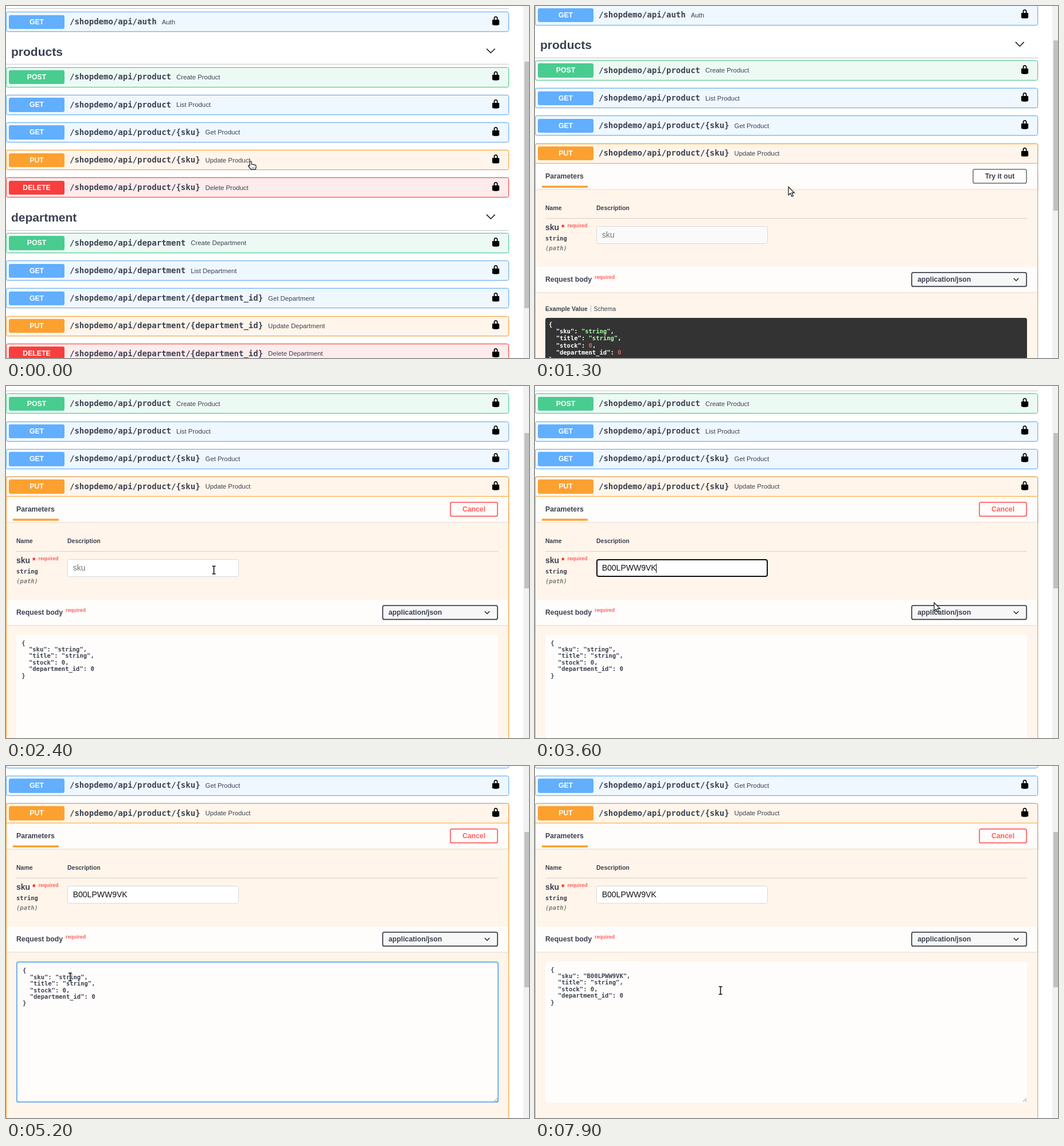
An HTML page for the animation above (8000 ms loop, 912 by 614 pixels).

```html
<!DOCTYPE html>
<html lang="en">
<head>
<meta charset="utf-8">
<title>API console</title>
<style>
  html, body { margin: 0; width: 100%; height: 100%; overflow: hidden; background: #fff; }
  svg { display: block; }
  text { font: 12.25px "Liberation Sans", Arial, sans-serif; fill: #3b4151; white-space: pre; }
  .b { font-weight: 700; }
  .m { font-family: "DejaVu Sans Mono", monospace; font-weight: 700; }
  .i { font-style: italic; }
  .mid { text-anchor: middle; }
  .row { filter: drop-shadow(0 0 1.3px rgba(0,0,0,.19)); }
  .band { filter: drop-shadow(0 1px 1px rgba(0,0,0,.1)); }
  .hover { filter: drop-shadow(0 0 2.5px rgba(0,0,0,.3)); }
</style>
</head>
<body>
<svg id="stage" width="912" height="614" viewBox="0 0 912 614"></svg>
<script>
const LOOP = 8000, STEP = 100;
const OPEN = 500, TRY = 2000, FOCUS_SKU = 3400, PASTE_SKU = 3500,
      FOCUS_BODY = 5200, SELECT = 5400, PASTE_BODY = 5600, CARET_OFF = 6400, BLUR = 7100;
const SKU = 'B00LPWW9VK', CODE_ADVANCE = 6.32, PATH_ADVANCE = 8.428;
const AUTH_Y = 10.1, PRODUCTS_LINE = 101.1, DEPARTMENT_LINE = 390.5;
const ROW_OFFSET = 5.5, ROW_PITCH = 48.2, PUT_Y = PRODUCTS_LINE + ROW_OFFSET + 3 * ROW_PITCH;
const INK = '#3b4151', ORANGE = '#fca130', RED = '#ff6060', PALE = '#fffdfb', RULE = '#c4c6ca';
const METHODS = {
  GET: ['#61affe', '#eff7ff'], POST: ['#49cc90', '#edfaf4'],
  PUT: [ORANGE, '#fff5ea'], DELETE: ['#f93e3e', '#feebeb']
};
const LOCK = 'M15.8 8H14V5.6C14 2.7 12.67 1 10 1S6 2.7 6 5.6V8H4c-.55 0-1 .65-1 1.2V17c0 .55.43 1.14.95 1.3l1.2.4c.52.16 1.4.3 1.95.3h5.8c.55 0 1.43-.14 1.95-.3l1.2-.4c.52-.16.95-.75.95-1.3V9.2C17 8.65 16.35 8 15.8 8zM12 8H8V5.2C8 3.75 8.8 3 10 3s2 .75 2 2.2z';

// Page heights are fractional; the browser snaps them to whole pixels after scrolling.
let scroll = 0;
const snap = y => Math.round(y - scroll);

const rect = (x, y, w, h, fill, extra = '') =>
  `<rect x="${x}" y="${y}" width="${w}" height="${h}" fill="${fill}" ${extra}/>`;
// Outer box with its border drawn inside the edge.
const box = (x, y, w, h, fill, stroke, line = 1, extra = '') =>
  rect(x + line / 2, y + line / 2, w - line, h - line, fill,
    `stroke="${stroke}" stroke-width="${line}" rx="3" ${extra}`);
const text = (x, y, str, size = 12.25, cls = 'b', fill = INK) =>
  `<text x="${x}" y="${y}" class="${cls}" style="font-size:${size}px;fill:${fill}">${str}</text>`;
const stroke = (d, color, width) =>
  `<path d="${d}" fill="none" stroke="${color}" stroke-width="${width}"/>`;
const span = (str, fill) => `<tspan style="fill:${fill}">${str}</tspan>`;

function summary(y, method, path, label) {
  const full = '/shopdemo/api/' + path;
  const top = snap(y + 5.4), bottom = snap(y + 29.8), baseline = snap(y + 21.4);
  return rect(5, top, 97, bottom - top, METHODS[method][0], 'rx="3"') +
    text(53.5, baseline, method, 12.25, 'b mid', '#fff') +
    text(111, snap(y + 21.7), full, 14, 'm') +
    text(111 + full.length * PATH_ADVANCE + 9, baseline, label, 11.375, '') +
    `<path d="${LOCK}" transform="translate(845.3 ${snap(y + 6.7)}) scale(.875)"/>`;
}

function row(y, method, path, label) {
  const [color, tint] = METHODS[method];
  return box(0, snap(y), 877, 35, tint, color, 1, 'class="row"') + summary(y, method, path, label);
}

function group(line, name, id) {
  const title = name[0].toUpperCase() + name.slice(1).replace(/s$/, '');
  const path = title.toLowerCase();
  const calls = [['POST', '', 'Create'], ['GET', '', 'List'], ['GET', id, 'Get'],
                 ['PUT', id, 'Update'], ['DELETE', id, 'Delete']];
  return text(9, snap(line - 14.1), name, 21) +
    stroke(`M838 ${line - 26.6 - scroll}l7.3 7.3 7.3-7.3`, '#111', 1.5) +
    rect(0, snap(line), 877, 1, RULE) +
    calls.map(([method, suffix, verb], i) =>
      row(line + ROW_OFFSET + i * ROW_PITCH, method, path + suffix, verb + ' ' + title)).join('');
}

const jsonLines = (sku, string = s => s, number = s => s) => [
  '{', `  "sku": ${sku},`, `  "title": ${string('"string"')},`,
  `  "stock": ${number('0')},`, `  "department_id": ${number('0')}`, '}'];
const code = (x, y, pitch, lines, fill) =>
  lines.map((line, i) => text(x, y + i * pitch, line, 10.5, 'm', fill)).join('');

function exampleValue() {
  const string = s => span(s, '#a2fca2'), number = s => span(s, '#d36363');
  return text(18, 543, 'Example Value', 10.5) + rect(97, 533, 1, 12, '#c0bcb8') +
    text(102.5, 543, 'Schema', 10.5, '') +
    rect(18, 555, 840, 85, '#333', 'rx="3.5"') +
    code(24, 569.8, 12.25, jsonLines(string('"string"'), string, number), '#fff') +
    rect(1, 693, 875, 44, PALE, 'class="band"');
}

function bodyEditor(t) {
  const focused = t >= FOCUS_BODY && t < BLUR;
  const pasted = t >= PASTE_BODY, selected = t >= SELECT && !pasted;
  const shift = focused ? 1.75 : 0;
  const word = pasted ? SKU : selected ? span('string', '#fff') : 'string';
  const caretOn = focused && !selected && t < CARET_OFF;
  return (focused ? box(18, 527, 841, 246, PALE, '#5ea9ef', 1.75)
                  : rect(18, 527, 840, 246, PALE, 'rx="3.5"')) +
    (selected ? rect(92, 548, 6 * CODE_ADVANCE + 1, 13, '#3584e4') : '') +
    code(27.3 + shift, 544.6 + shift, 11.4, jsonLines(`"${word}"`)) +
    (caretOn ? rect(pasted ? 155 : 111, 548, 1, 13, '#222') : '') +
    stroke('M851 771.5l6-6M855 771.5l2.5-2.5', '#777', 1);
}

function skuField(t) {
  const focused = t >= FOCUS_SKU && t < FOCUS_BODY, pasted = t >= PASTE_SKU;
  const caretOn = focused && Math.floor((t - PASTE_SKU) / 500) % 2 === 0;
  return box(107, 395, 299, 31, t < TRY ? '#fafafa' : '#fff',
      focused ? '#101010' : '#d9d9d9', focused ? 2 : 1) +
    text(116.7, 415, pasted ? SKU : 'sku', 14, '', pasted ? '#111' : '#757575') +
    (caretOn ? rect(pasted ? 211 : 117, 403, 1, 16, '#111') : '');
}

function modeButton(t) {
  const hover = t >= 1700 && t <= 2200 ? 'class="hover"' : '';
  return t < TRY
    ? box(763, 295, 95, 26, PALE, '#808080', 1.75, hover) + text(810.5, 312, 'Try it out', 12.25, 'b mid')
    : box(774, 295, 84, 26, PALE, RED, 1.75, hover) + text(816, 312, 'Cancel', 12.25, 'b mid', RED);
}

// The panel is laid out around a row whose top edge is at 251.
function putPanel(t) {
  return `<g transform="translate(0 ${snap(PUT_Y) - 251})">` +
    box(0, 251, 877, 700, METHODS.PUT[1], ORANGE, 1, 'class="row"') +
    rect(1, 286, 875, 44, PALE, 'class="band"') + rect(1, 285, 875, 1, ORANGE) +
    text(18, 312, 'Parameters') + rect(12, 324.5, 80, 3.5, ORANGE) + modeButton(t) +
    text(18, 367, 'Name', 10.5) + text(107, 367, 'Description', 10.5) +
    rect(18, 381, 840, 1, '#d8d1cb') +
    text(18, 402, 'sku', 14) + text(46, 402, '*', 14, 'b', '#f11') +
    text(56.5, 397, 'required', 8.75, 'b', RED) +
    text(18, 420, 'string', 10.5, 'm') + text(18, 437, '(path)', 10.5, 'm i', '#808080') +
    skuField(t) +
    rect(1, 466, 875, 44, PALE, 'class="band"') + text(18, 492, 'Request body') +
    text(104, 486.5, 'required', 8.75, 'b', RED) +
    box(656, 475, 202, 26, '#f7f7f7', '#41444e', 1.75, 'class="band"') +
    text(667, 492, 'application/json') + stroke('M834.8 486l4.2 4.2 4.2-4.2', '#222', 1.5) +
    (t < TRY ? exampleValue() : bodyEditor(t)) + '</g>' +
    summary(PUT_Y, 'PUT', 'product/{sku}', 'Update Product');
}

const CURSORS = {
  none: '',
  arrow: '<path d="M0 0V14.2L3.3 11.2 5.8 16.7 8.2 15.6 5.8 10.3H10.2Z" fill="#fff" stroke="#111" stroke-width="1.2"/>',
  hand: '<path d="M.5.5Q2 .5 2 2V6L8.2 7.2Q10 7.6 10 9.2V12L9 15.2H1.5L-3 9.8Q-3.8 8.2-2.2 7.8L-1 8.8V2Q-1 .5.5.5Z" fill="#fff" stroke="#111" stroke-width="1.2"/><path d="M3 11v2.5M5 11v2.5M7 11v2.5" stroke="#555" stroke-width=".8"/>',
  beam: [['#fff', 3.4], ['#111', 1.6]].map(([color, width]) =>
    stroke('M-3-6.7H-.8L0-6 .8-6.7H3M0-6V6M-3 6.7H-.8L0 6 .8 6.7H3', color, width)).join('')
};
// time, shape, x, y
const MOVES = [
  [0, 'hand', 426, 270], [500, 'hand', 426, 270], [900, 'hand', 430, 276],
  [1000, 'arrow', 434, 292], [1300, 'arrow', 442, 315.5], [1500, 'arrow', 757, 254],
  [1700, 'hand', 806, 213], [2200, 'hand', 810, 214], [2300, 'arrow', 560, 275],
  [2400, 'beam', 362.5, 321], [3500, 'beam', 362.5, 321], [3600, 'arrow', 696, 378],
  [3800, 'arrow', 696, 378], [3900, 'arrow', 680, 360], [4000, 'arrow', 675, 356],
  [4300, 'beam', 675, 356], [5100, 'beam', 112, 368], [5600, 'beam', 112, 368],
  [5800, 'beam', 779, 456], [5900, 'none', 0, 0], [7900, 'beam', 323.5, 391.5], [LOOP, 'beam', 323.5, 391.5]
];

function cursor(t) {
  const i = MOVES.findIndex(move => move[0] > t);
  const [t0, shape, x0, y0] = MOVES[i - 1], [t1, , x1, y1] = MOVES[i];
  const k = (t - t0) / (t1 - t0);
  return `<g transform="translate(${x0 + (x1 - x0) * k} ${y0 + (y1 - y0) * k})">${CURSORS[shape]}</g>`;
}

function scrollAt(t) {
  if (t < 1300) return 0;
  if (t < 1600) return [11.6, 55, 91.6][(t - 1300) / STEP];
  return t < 4300 ? 93.3 : 186.3;
}

function scrollbar(t) {
  const [y, height] = t < OPEN ? [97, 430]
    : t < TRY ? [55.5 + scroll * .3875, 297]
    : [48.9 + scroll * .355, 271];
  return rect(902, 0, 10, 614, '#f1f1f1') + rect(904, Math.round(y), 8, height, '#c1c1c1');
}

function scene(t) {
  scroll = scrollAt(t);
  return rect(0, snap(4), 877, 1, RULE) + row(AUTH_Y, 'GET', 'auth', 'Auth') +
    group(PRODUCTS_LINE, 'products', '/{sku}') +
    (t < OPEN ? group(DEPARTMENT_LINE, 'department', '/{department_id}') : putPanel(t)) +
    scrollbar(t) + cursor(t);
}

const stage = document.getElementById('stage');
let shown = -1;
function tick() {
  const t = Math.floor(performance.now() % LOOP / STEP) * STEP;
  if (t !== shown) stage.innerHTML = scene(shown = t);
  requestAnimationFrame(tick);
}
tick();
</script>
</body>
</html>
```
